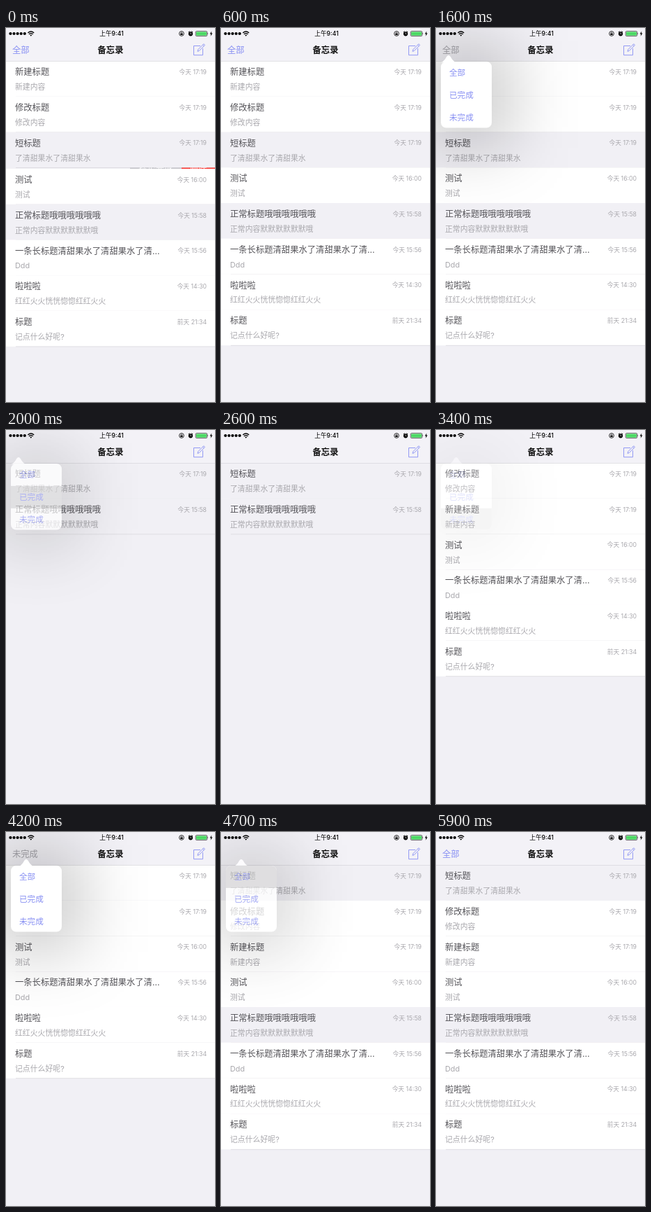
An HTML page for the animation above (6 s loop, 300x534 px).

```html
<!DOCTYPE html>
<html lang="zh-CN">
<head>
<meta charset="utf-8">
<style>
html, body { margin: 0; width: 100%; height: 100%; overflow: hidden; background: #f1f0f5; }
svg { display: block; width: 300px; height: 534px; font-family: Inter, "Noto Sans CJK SC", "Noto Sans CJK", sans-serif; }
</style>
</head>
<body>
<svg id="stage" viewBox="0 0 300 534"></svg>
<script>
const stage = document.getElementById('stage');
const BLUE = '#8890f3', LOOP = 6000, TOP = 46.4, ROW = 50.72, ITEM = 31.9;

const notes = {
  fresh: ['新建标题', '新建内容', '今天 17:19'],
  edited: ['修改标题', '修改内容', '今天 17:19'],
  short: ['短标题', '了清甜果水了清甜果水', '今天 17:19', true],
  test: ['测试', '测试', '今天 16:00'],
  normal: ['正常标题哦哦哦哦哦哦', '正常内容默默默默默默哦', '今天 15:58', true],
  long: ['一条长标题清甜果水了清甜果水了清…', 'Ddd', '今天 15:56'],
  la: ['啦啦啦', '红红火火恍恍惚惚红红火火', '今天 14:30'],
  last: ['标题', '记点什么好呢?', '前天 21:34']
};
const lists = [
  'fresh edited short test normal long la last',
  'short normal',
  'edited fresh test long la last',
  'short edited fresh test normal long la last'
].map(s => s.split(' ').map(k => notes[k]));
const filters = ['全部', '已完成', '未完成'];

// Each menu: opens, fully shown, item pressed, fade begins, gone
const menus = [
  { open: 1000, shown: 1200, press: 1900, fade: 1900, gone: 2200, from: 0, pick: 1 },
  { open: 2600, shown: 2800, press: 3000, fade: 3100, gone: 3500, from: 1, pick: 2 },
  { open: 3900, shown: 4200, press: 4500, fade: 4600, gone: 5000, from: 2, pick: 0 }
];

const text = (s, x, y, size, fill, extra = '') =>
  `<text x="${x}" y="${y}" font-size="${size}" fill="${fill}" ${extra}>${s}</text>`;
const rect = (x, y, w, h, fill, extra = '') =>
  `<rect x="${x}" y="${y}" width="${w}" height="${h}" fill="${fill}" ${extra}/>`;
const END = 'text-anchor="end"', MID = 'text-anchor="middle"';

function row([title, body, date, done], y) {
  return rect(0, y, 300, ROW + .3, done ? '#f1f0f5' : '#fff') +
    rect(14, y + ROW, 286, .7, '#d6d5da') +
    text(title, 13, y + 20.2, 12.32, '#555459') +
    text(body, 13, y + 41, 10.87, '#a9a8ad') +
    text(date, 288, y + 18.9, 8.7, '#a9a8ad', END);
}

// Swipe buttons of a deleted row, seen through the closing gap
function swipe(y, h) {
  return `<svg x="178" y="${y}" width="122" height="${h}">` +
    rect(0, 0, 74, h, '#c7c7cc') + rect(74, 0, 48, h, '#fb3f3a') +
    text('标记完成', 37, 5, 12.3, '#fff', MID) + text('删除', 98, 5, 12.3, '#fff', MID) + '</svg>';
}

function statusBar() {
  let s = '';
  for (let i = 0; i < 5; i++) s += `<circle cx="${6.4 + i * 5.1}" cy="8" r="2.1"/>`;
  return s + `<g fill="none" stroke="#000" stroke-width="1.3">
    <path d="M31.4 7q4.4-4 8.8 0M33 8.9q2.8-2.5 5.6 0"/>
    <circle cx="252" cy="8" r="3.4" stroke-width=".8"/>
    <path d="M251 8V7a1 1 0 0 1 2 0v1" stroke-width=".6"/>
    <path d="M262 6l1.5-1.4M268 6l-1.5-1.4" stroke-width="1"/>
    <rect x="272.3" y="4.6" width="16.4" height="7" rx="1.4" stroke-width=".6"/></g>
    <path d="M34.4 10.2q1.4-1.2 2.8 0l-1.4 1.5zM250.4 7.8h3.2v2.2h-3.2zM289.4 7v2.2q1.2-1.1 0-2.2zM295.3 4.5l-2.7 4h1.7l-.7 3.2 2.9-4.2h-1.8z"/>
    <circle cx="265" cy="8.3" r="3.1"/>
    <path d="M265 6.5v2h1.4" fill="none" stroke="#fff" stroke-width=".6"/>` +
    rect(273.1, 5.4, 14.8, 5.4, '#4cd964', 'rx=".8"') +
    text('上午9:41', 151.5, 11.2, 8.7, '#000', MID + ' font-weight="500"');
}

function navBar(label, fill, alpha) {
  return rect(0, 0, 300, TOP + .6, '#f3f2f7') + rect(0, TOP + .6, 300, .6, '#d3d2d7') + statusBar() +
    text('备忘录', 150, 35.8, 12.32, '#111', MID + ' font-weight="600"') +
    text(label, 9, 35.8, 12.32, fill, `opacity="${alpha}"`) +
    `<path d="M279 25.5h-9.5v13.2h13v-9.5M275 33.4l.8-2.7 8-8 1.7 1.7-8 8zM282.4 24l1.7 1.7" fill="none" stroke="${BLUE}" stroke-width=".9"/>`;
}

function popover(menu, alpha, pressed) {
  const tip = menu.from ? 29 : 18;
  return `<g opacity="${alpha}">
    <rect x="-23" y="18" width="133" height="154" fill-opacity=".2" style="filter:blur(45px)"/>
    <clipPath id="card"><rect x="7" y="48" width="73" height="94.5" rx="7.5"/></clipPath>
    <path d="M${tip - 11} 49q4-1 7-6q4-8 8 0q3 5 7 6z" fill="#fff"/>
    <g clip-path="url(#card)">` + rect(7, 48, 73, 95, '#fff') +
    (pressed ? rect(7, 48 + menu.pick * ITEM, 73, ITEM, '#d9d9d9') : '') + '</g>' +
    filters.map((s, i) => text(s, 19, 68.3 + i * ITEM, 11.6, BLUE)).join('') + '</g>';
}

function draw(t) {
  let list = 0, label = 0, fill = BLUE, alpha = 1, over = '';
  menus.forEach((m, i) => {
    if (t < m.open) return;
    if (t > m.fade) list = i + 1;
    if (t >= m.gone) {
      label = m.pick;
      alpha = Math.min(1, (t - m.gone + 100) / 200);
      return;
    }
    const a = Math.min(1, (t - m.open) / (m.shown - m.open), (m.gone - t) / (m.gone - m.fade));
    label = m.from;
    fill = '#a5a4aa';
    alpha = t > m.fade ? 0 : a;
    if (a > 0) over = popover(m, a, t >= m.press);
  });
  const gap = t < 100 ? 1.7 : t < 200 ? .5 : 0;
  const rows = lists[list].map((n, i) => row(n, TOP + .7 + i * ROW + (i > 2 ? gap : 0))).join('');
  stage.innerHTML = rows + (gap ? swipe(199.2, gap + .3) : '') + navBar(filters[label], fill, alpha) + over;
}

// The picture moves in steps of a tenth of a second
let shown = -1;
const start = performance.now();
function tick() {
  const t = Math.floor((performance.now() - start) % LOOP / 100) * 100;
  if (t !== shown) draw(shown = t);
  requestAnimationFrame(tick);
}
tick();
</script>
</body>
</html>
```
